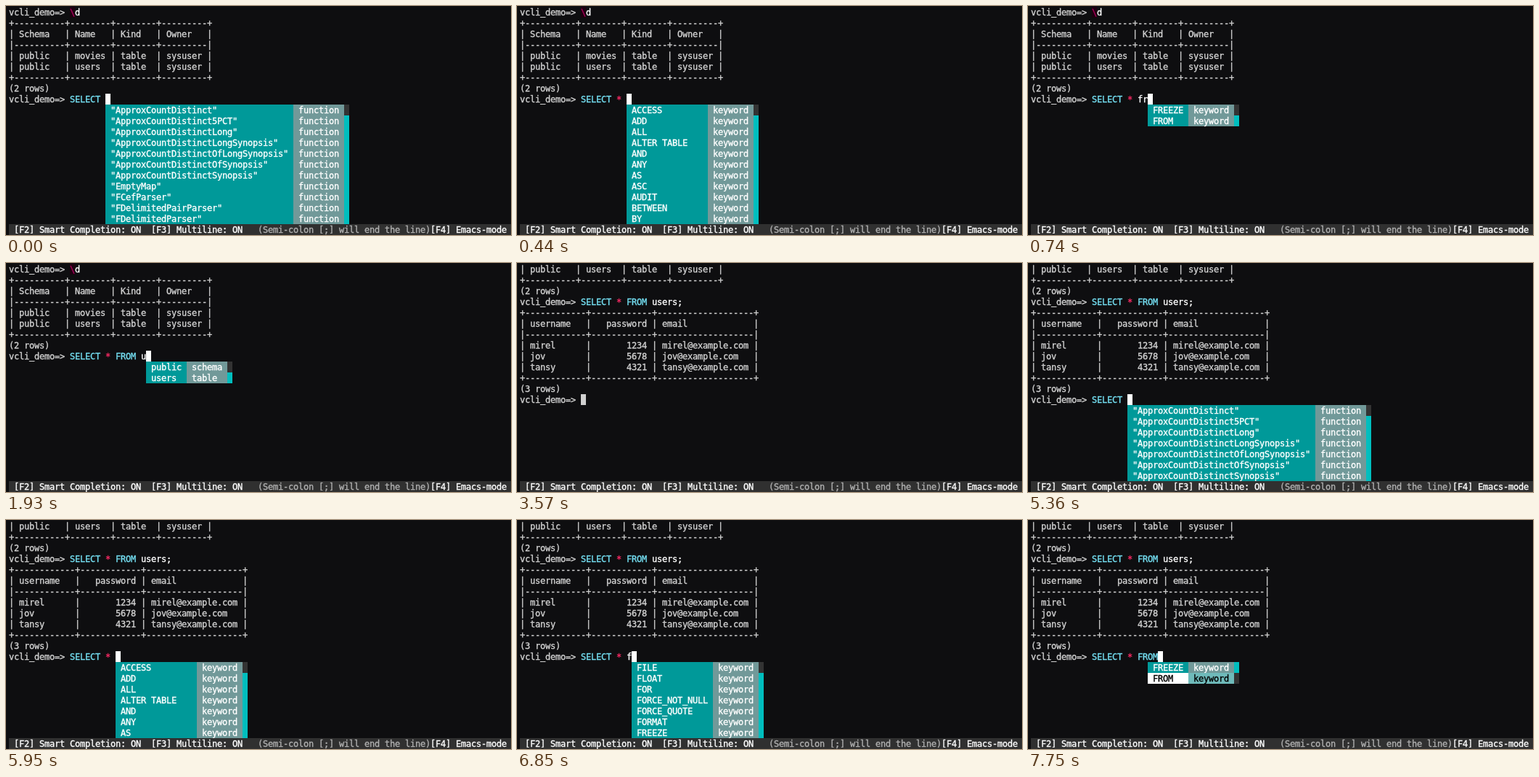
An HTML page for the animation above (8 s loop, 696 px wide and 316 px high).

```html
<!DOCTYPE html>
<html lang="en">
<head>
<meta charset="utf-8">
<title>SQL prompt with completion</title>
<style>
  html, body { margin: 0; width: 100%; height: 100%; overflow: hidden; background: #0e0e10; }
  #stage { position: relative; width: 696px; height: 316px; overflow: hidden; }
  /* The taller line sets the baseline one pixel lower in each cell; the stroke thickens the type. */
  #stage, #probe {
    font: 12px/17px "DejaVu Sans Mono", "Liberation Mono", monospace;
    white-space: pre;
    -webkit-text-stroke: 0.35px currentColor;
  }
  #probe { position: absolute; visibility: hidden; }
  .cell { position: absolute; height: 15px; color: #d2d2d2; }
  .input { color: #fff; }
  .keyword { color: #74dff2; }
  .star { color: #f92a64; }
  .error { color: #a8005a; background: #1e0010; }
  .cursor { background: #fff; }
  .cursor.idle { background: #d0d0d0; }
  .name { background: #009999; color: #fff; }
  .meta { background: #719999; color: #fff; }
  .name.on { background: #fff; color: #000; }
  .meta.on { background: #6fbaba; color: #000; }
  .bar { background: #00bebe; }
  .thumb { background: #333; }
  .status { background: #303030; color: #fff; }
  .hint { color: #b0b0b0; }
</style>
</head>
<body>
<div id="stage"></div>
<script>
const CELL_W = 7, CELL_H = 15, LEFT = 4, TOP = 1;
const STATUS_ROW = 20, LOOP = 8000;
const PROMPT = 'vcli_demo=> ';
const stage = document.getElementById('stage');

// Completion sources: [name, kind]
const tag = (kind, names) => names.map(name => [name, kind]);
const functions = tag('function', [
  'ApproxCountDistinct', 'ApproxCountDistinct5PCT', 'ApproxCountDistinctLong',
  'ApproxCountDistinctLongSynopsis', 'ApproxCountDistinctOfLongSynopsis',
  'ApproxCountDistinctOfSynopsis', 'ApproxCountDistinctSynopsis', 'EmptyMap',
  'FCefParser', 'FDelimitedPairParser', 'FDelimitedParser'
].map(name => `"${name}"`));
const keywords = tag('keyword', [
  'ACCESS', 'ADD', 'ALL', 'ALTER TABLE', 'AND', 'ANY', 'AS', 'ASC', 'AUDIT', 'BETWEEN', 'BY',
  'FILE', 'FLOAT', 'FOR', 'FORCE_NOT_NULL', 'FORCE_QUOTE', 'FORMAT', 'FREEZE', 'FROM', 'FULL', 'FUNCTION',
  'SELECT', 'SESSION', 'SET', 'SHARE', 'SIZE', 'SMALLINT', 'START', 'SUCCESSFUL', 'SYNONYM', 'SYSDATE'
]);
const relations = [
  ...tag('schema', ['public', 'v_catalog', 'v_internal', 'v_monitor', 'v_txtindex']),
  ...tag('table', ['movies', 'users'])
];
const keys = prefix => keywords.filter(([name]) => name.startsWith(prefix));
const rels = part => relations.filter(([name]) => name.includes(part));

// Output tables; widths are cell widths, negative means right-aligned.
function table(widths, head, rows) {
  const rule = edge => edge + widths.map(w => '-'.repeat(Math.abs(w) + 2)).join('+') + edge;
  const line = cells => '| ' + cells.map((c, i) =>
    widths[i] < 0 ? c.padStart(-widths[i]) : c.padEnd(widths[i])).join(' | ') + ' |';
  return [rule('+'), line(head), rule('|'), ...rows.map(line), rule('+'), `(${rows.length} rows)`];
}
const listing = [PROMPT + '\\d', ...table([8, 6, 6, 7], ['Schema', 'Name', 'Kind', 'Owner'], [
  ['public', 'movies', 'table', 'sysuser'],
  ['public', 'users', 'table', 'sysuser']
])];
const people = [['mirel', '1234'], ['jov', '5678'], ['tansy', '4321']]
  .map(([user, code]) => [user, code, user + '@example.com']);
const result = [...listing.slice(5), PROMPT + 'SELECT * FROM users;',
  ...table([10, -10, 17], ['username', 'password', 'email'], people)];

// [time, typed text, completions, picked row, text length where the menu opened]
const steps = [
  [0, 'SELECT ', functions],
  [290, 'SELECT *'],
  [440, 'SELECT * ', keys('')],
  [590, 'SELECT * f', keys('F')],
  [740, 'SELECT * fr', keys('FR')],
  [880, 'SELECT * fro', keys('FRO')],
  [1180, 'SELECT * FROM', keys('FRO'), 0, 12],
  [1330, 'SELECT * FROM ', rels('')],
  [1930, 'SELECT * FROM u', rels('u')],
  [2080, 'SELECT * FROM us', rels('us')],
  [2230, 'SELECT * FROM use', rels('use')],
  [2530, 'SELECT * FROM users', rels('use'), 0, 17],
  [2820, 'SELECT * FROM users;'],
  [3570, ''],
  [4620, 's', keys('S')],
  [4760, 'se', keys('SE')],
  [4910, 'sel', keys('SEL')],
  [5060, 'SELECT', keys('SEL'), 0, 3],
  [5360, 'SELECT ', functions],
  [5800, 'SELECT *'],
  [5950, 'SELECT * ', keys('')],
  [6850, 'SELECT * f', keys('F')],
  [7150, 'SELECT * fr', keys('FR')],
  [7450, 'SELECT * FREEZE', keys('FR'), 0, 11],
  [7750, 'SELECT * FROM', keys('FR'), 1, 11]
];
const ENTER = 3570;

function put(col, row, text, style = '', cols = text.length) {
  const el = document.createElement('div');
  el.className = 'cell ' + style;
  el.textContent = text;
  el.style.left = LEFT + col * CELL_W + 'px';
  el.style.top = TOP + row * CELL_H + 'px';
  el.style.width = cols * CELL_W + 'px';
  stage.append(el);
  return el;
}

function tokenStyle(token) {
  if (/^(SELECT|FROM|FREEZE)$/.test(token)) return 'keyword';
  return { '*': 'star', '\\': 'error' }[token] || 'input';
}

function putInput(row, text) {
  put(0, row, PROMPT);
  for (const m of text.matchAll(/\w+|[^\w\s]/g))
    put(PROMPT.length + m.index, row, m[0], tokenStyle(m[0]));
}

function putMenu(col, row, items, pick) {
  const widest = i => Math.max(...items.map(item => item[i].length)) + 2;
  const nameW = widest(0), metaW = widest(1);
  items.slice(0, STATUS_ROW - row).forEach(([name, kind], i) => {
    const on = i === pick ? ' on' : '';
    put(col, row + i, ' ' + name, 'name' + on, nameW);
    put(col + nameW, row + i, ' ' + kind, 'meta' + on, metaW);
    put(col + nameW + metaW, row + i, '', i === (pick ?? 0) ? 'thumb' : 'bar', 1);
  });
}

function putStatus() {
  put(0, STATUS_ROW, ' [F2] Smart Completion: ON  [F3] Multiline: ON', 'status').style.width = '692px';
  put(49, STATUS_ROW, '(Semi-colon [;] will end the line)', 'hint');
  put(83, STATUS_ROW, '[F4] Emacs-mode', 'input');
}

function draw([time, typed, items, pick, openedAt = typed.length]) {
  stage.replaceChildren();
  const lines = time < ENTER ? listing : result;
  lines.forEach((line, row) => line.startsWith(PROMPT)
    ? putInput(row, line.slice(PROMPT.length)) : put(0, row, line));
  const row = lines.length;
  putInput(row, typed);
  put(PROMPT.length + typed.length, row, '', typed ? 'cursor' : 'cursor idle', 1);
  if (items) putMenu(PROMPT.length + openedAt, row + 1, items, pick);
  putStatus();
}

// Snap the font's advance to the terminal grid.
function fitGrid() {
  const probe = document.createElement('span');
  probe.id = 'probe';
  probe.textContent = 'x'.repeat(100);
  document.body.append(probe);
  stage.style.letterSpacing = CELL_W - probe.getBoundingClientRect().width / 100 + 'px';
  probe.remove();
}

let shown;
const start = performance.now();
function tick() {
  const t = (performance.now() - start) % LOOP;
  const step = steps.findLast(s => s[0] <= t);
  if (step !== shown) draw(shown = step);
  requestAnimationFrame(tick);
}
fitGrid();
tick();
</script>
</body>
</html>
```
